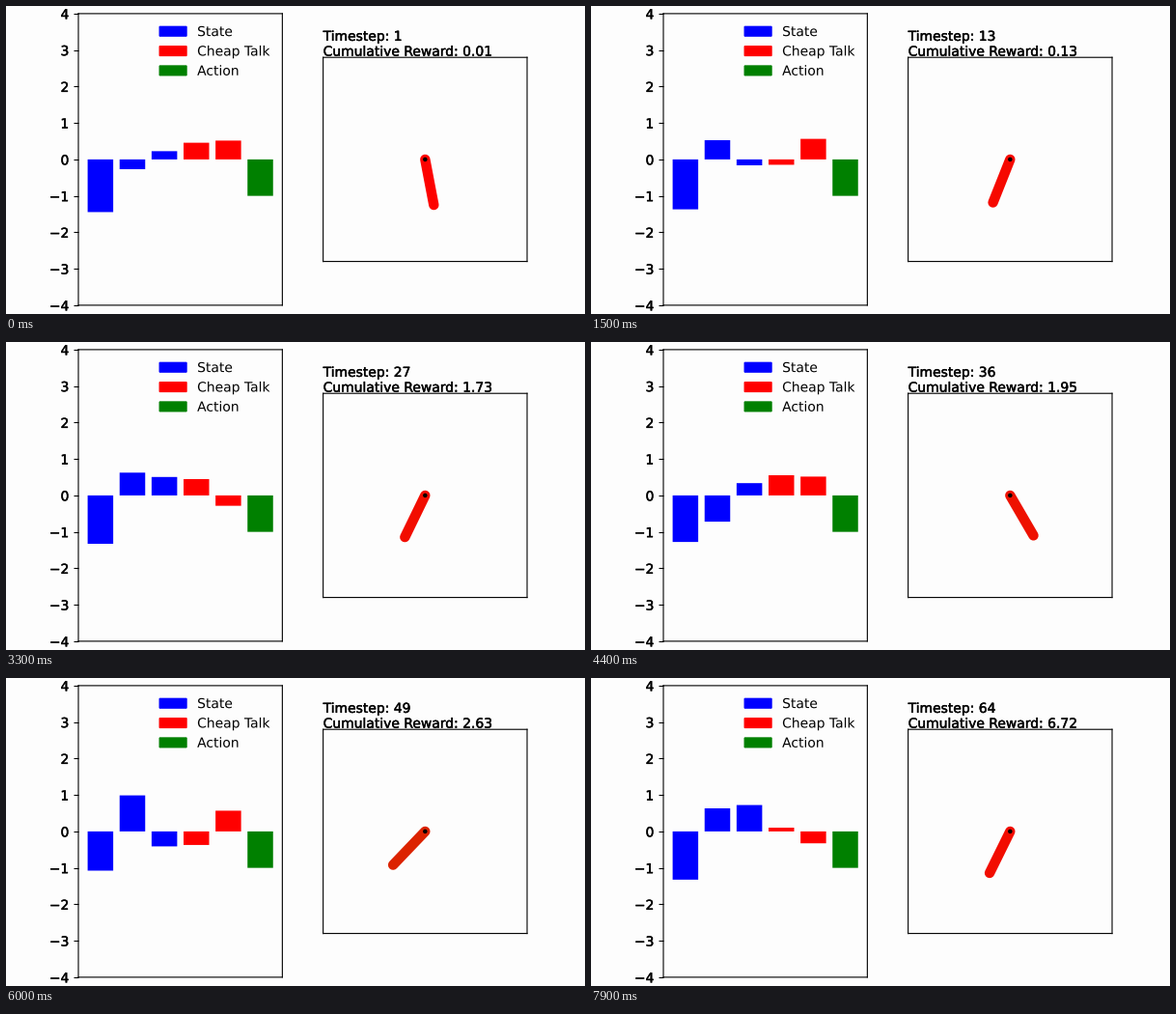
These frames come from a looping animation (600 px wide and 319 px high, 8000 ms). A matplotlib script:

```python
import numpy as np
import matplotlib.pyplot as plt
from matplotlib.animation import FuncAnimation
from matplotlib.patches import Circle, Patch
from matplotlib.patheffects import Normal, withStroke

W, H, DPI = 600, 319, 100
FRAMES, INTERVAL = 80, 100
PAPER = "#fdfdfd"

# Turning points of the swing: timestep, degrees from hanging straight down
TURNS = np.array([(-10.8, -11), (3.2, 12.2), (21.2, -47.3),
                  (38, 33), (55.6, -78), (74.3, 45)])


def swing(step):
    """Angle in degrees, eased like a cosine from one turning point to the next."""
    when, where = TURNS.T
    i = np.searchsorted(when, step) - 1
    part = (step - when[i]) / (when[i + 1] - when[i])
    return where[i] + (where[i + 1] - where[i]) * (1 - np.cos(np.pi * part)) / 2


steps = np.arange(65)
angle = np.radians(swing(steps))
speed = swing(steps) - swing(steps - 1)
reward = (1 - np.cos(angle)) / 2
total = np.cumsum(reward) - reward[0]

# Both messages answer to the pose; the action is a steady push, briefly reversed
talk_a = 0.5 * np.cos((speed - 3.5) / 4.5) + 0.8 * reward
talk_b = 0.12 + 0.45 * np.tanh(1.5 + 2 * np.sin(angle) - speed / 3)
action = np.where(steps % 14 == 4, 1, -1)
heights = np.column_stack([-1.42 * np.cos(angle) - 0.05, -1.43 * np.sin(angle),
                           0.14 + 0.0583 * speed, talk_a, talk_b, action])

plt.rcParams.update({"font.family": "DejaVu Sans", "font.size": 10,
                     "path.snap": False, "axes.facecolor": PAPER})
fig = plt.figure(figsize=(W / DPI, H / DPI), dpi=DPI, facecolor=PAPER)
BOLDER = [withStroke(linewidth=0.3, foreground="black")]

SIDE = 465 / 2.2
SCENE_LEFT = 540 - SIDE
MIDDLE = 158.9


def add_axes(left, height, **settings):
    axes = fig.add_axes([left / W, 1 - (MIDDLE + height / 2) / H,
                         SIDE / W, height / H])
    axes.set(**settings)
    return axes


def add_label(baseline):
    return fig.text(SCENE_LEFT / W, 1 - baseline / H, "", va="baseline",
                    path_effects=BOLDER)


chart = add_axes(75, 302, xlim=(-0.69, 5.69), ylim=(-4, 4),
                 xticks=[], yticks=range(-4, 5))
bars = chart.bar(range(6), heights[1],
                 color=["blue"] * 3 + ["red"] * 2 + ["green"])
for tick_label in chart.get_yticklabels():
    tick_label.set_path_effects(BOLDER)

names = {"State": "blue", "Cheap Talk": "red", "Action": "green"}
legend = chart.legend(handles=[Patch(color=c, label=n) for n, c in names.items()],
                      loc="upper right", bbox_to_anchor=(1, 1.001),
                      labelspacing=0.455, frameon=False)
for entry in legend.get_texts():
    entry.set_path_effects([Normal()])

scene = add_axes(SCENE_LEFT, SIDE, xlim=(-2.2, 2.2), ylim=(-2.2, 2.2),
                 xticks=[], yticks=[])
rod, = scene.plot([], [], lw=7.5, solid_capstyle="round")
scene.add_patch(Circle((0, 0), 0.047, color="black", lw=0, zorder=3))
step_label, reward_label = add_label(35.9), add_label(51.6)


def draw(frame):
    # every fifth frame holds the previous step
    step = frame + 1 - (frame + 3) // 5
    for bar, height in zip(bars, heights[step]):
        bar.set_height(height)
    rod.set_data([0, np.sin(angle[step])], [0, -np.cos(angle[step])])
    rod.set_color((1 - reward[step], reward[step], 0))
    step_label.set_text(f"Timestep: {step}")
    reward_label.set_text(f"Cumulative Reward: {total[step]:.2f}")
    return [*bars, rod, step_label, reward_label]


animation = FuncAnimation(fig, draw, frames=FRAMES, interval=INTERVAL,
                          repeat=True, repeat_delay=0)
plt.show()
```
